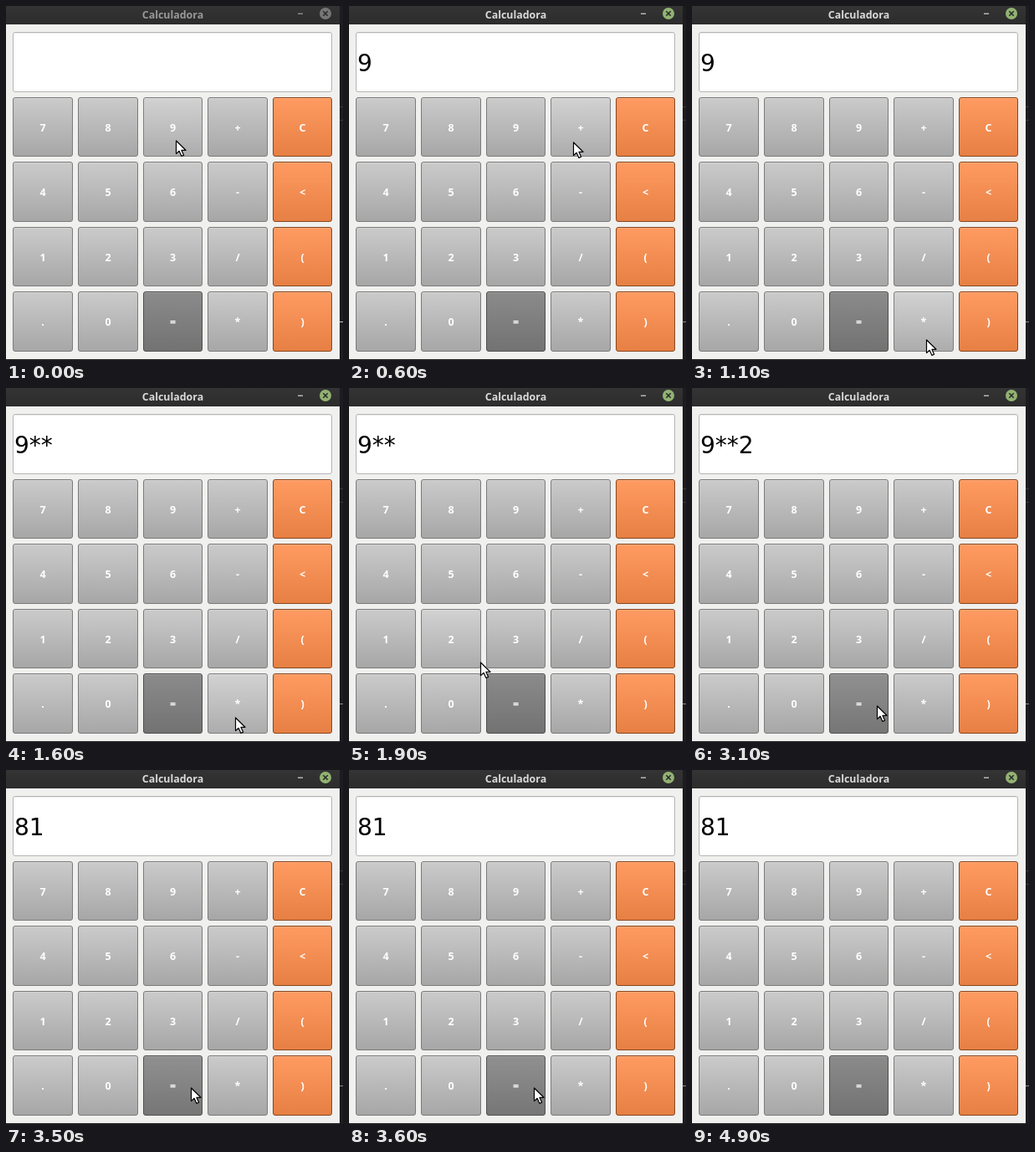
An HTML page with a canvas for the animation above (5600 ms loop, 403 by 423 pixels).

```html
<!DOCTYPE html>
<html lang="es">
<head>
<meta charset="utf-8">
<title>Calculadora</title>
<style>
  html, body { margin: 0; width: 100%; height: 100%; overflow: hidden; background: #1e1c20; }
  canvas { display: block; }
</style>
</head>
<body>
<canvas id="stage" width="403" height="423"></canvas>
<script>
const ctx = document.getElementById('stage').getContext('2d');
const LOOP = 5600, STEP = 100;
const PITCH = 77.6, SIZE = 71.6;
const rows = ['789+C', '456-<', '123/(', '.0=*)'];

const themes = {
  grey:   { top: '#cbcbcb', bottom: '#a6a6a6', edge: '#7b7b7b' },
  dark:   { top: '#8b8b8b', bottom: '#727272', edge: '#4f4f4f' },
  orange: { top: '#ff9b62', bottom: '#e67f43', edge: '#87481f' }
};

const presses = [
  { key: '9', time: 300 }, { key: '*', time: 1300 }, { key: '*', time: 1500 },
  { key: '2', time: 2400 }, { key: '=', time: 3500 }
];

// Each move glides to a point; bow bends its path sideways.
const home = { x: 203, y: 160 };
const moves = [
  { from: 400, to: 600, x: 268, y: 162 },
  { from: 600, to: 1100, x: 280, y: 398, bow: 24 },
  { from: 1500, to: 1600, x: 274, y: 393 },
  { from: 1600, to: 2200, x: 118, y: 305 },
  { from: 2600, to: 2700, x: 224, y: 399 },
  { from: 2900, to: 3100, x: 221, y: 379 },
  { from: 4600, to: 4800, x: 127, y: 95 }
];
const LEAVE = 4900;

const easeOut = p => 1 - (1 - p) ** 2;

function pointerAt(t) {
  let { x, y } = home;
  for (const move of moves) {
    if (t < move.from) break;
    const p = easeOut(Math.min(1, (t - move.from) / (move.to - move.from)));
    x += (move.x - x) * p + (move.bow || 0) * Math.sin(Math.PI * p);
    y += (move.y - y) * p;
  }
  return { x: Math.round(x), y: Math.round(y) };
}

function displayAt(t) {
  const typed = presses.filter(press => press.time <= t).map(press => press.key).join('');
  if (!typed.endsWith('=')) return typed;
  const [base, power] = typed.slice(0, -1).split('**');
  return String(base ** power);
}

function fill(color, x, y, w, h) {
  ctx.fillStyle = color;
  ctx.fillRect(x, y, w, h);
}

function shade(top, bottom, y, h) {
  const paint = ctx.createLinearGradient(0, y, 0, y + h);
  paint.addColorStop(0, top);
  paint.addColorStop(1, bottom);
  return paint;
}

function box(x, y, w, h, paint, edge) {
  ctx.beginPath();
  ctx.roundRect(x + 0.5, y + 0.5, w - 1, h - 1, 2.5);
  ctx.fillStyle = paint;
  ctx.fill();
  ctx.strokeStyle = edge;
  ctx.lineWidth = 1;
  ctx.stroke();
}

function text(str, x, y, font, color, align = 'center') {
  ctx.font = font;
  ctx.fillStyle = color;
  ctx.textAlign = align;
  ctx.fillText(str, x, y);
}

function drawWindow(active) {
  fill('#1e1c20', 0, 0, 403, 423);
  fill('#39373b', 399, 120, 4, 1);
  fill('#39373b', 399, 136, 4, 1);
  fill(active ? '#8b8a8d' : '#c4c4c6', 399, 377, 4, 1);
  fill('#f0f0ef', 0, 22, 399, 400);
  fill(shade('#343434', '#2c2c2c', 0, 22), 0, 0, 399, 22);

  const ink = active ? '#dadada' : '#999999';
  text('Calculadora', 199.5, 15, '600 12.4px "Noto Sans", sans-serif', ink);
  fill(active ? '#b5b5b5' : '#888888', 349, 8.5, 6, 1.5);

  ctx.beginPath();
  ctx.arc(382, 9, 7, 0, Math.PI * 2);
  ctx.fillStyle = active ? '#92b372' : '#777777';
  ctx.fill();
  ctx.beginPath();
  for (const side of [-2.7, 2.7]) {
    ctx.moveTo(382 - side, 6.3);
    ctx.lineTo(382 + side, 11.7);
  }
  ctx.strokeStyle = '#2b2b2b';
  ctx.lineWidth = 1.6;
  ctx.stroke();
}

function drawDisplay(value) {
  box(8, 31, 382, 72, '#ffffff', '#b4b4b4');
  fill('#ebebeb', 10, 32, 378, 1);
  text(value, 10, 78, '28px "DejaVu Sans", sans-serif', '#000000', 'left');
}

function drawButton(label, col, row, pointer) {
  const left = 8.4 + col * PITCH, top = 108.8 + row * (PITCH - 0.2);
  const x = Math.round(left), w = Math.round(left + SIZE) - x;
  const y = Math.round(top), h = Math.round(top + SIZE) - y;
  const theme = themes[col === 4 ? 'orange' : label === '=' ? 'dark' : 'grey'];
  const hover = pointer.x >= x && pointer.x < x + w && pointer.y >= y && pointer.y < y + h;

  ctx.filter = hover ? 'brightness(1.04)' : 'none';
  box(x, y, w, h, shade(theme.top, theme.bottom, y, h), theme.edge);
  ctx.filter = 'none';
  fill('rgba(255,255,255,0.16)', x + 2, y + 1, w - 4, 1);
  text(label, x + w / 2, Math.round(y + h / 2 + 5), 'bold 12.5px "Noto Sans", sans-serif', '#ffffff');
}

function drawPointer({ x, y }) {
  ctx.save();
  ctx.translate(x, y);
  ctx.fillStyle = '#ffffff';
  ctx.strokeStyle = '#000000';
  ctx.lineWidth = 1.2;
  ctx.lineJoin = 'round';
  const arrow = new Path2D('M.5 1V16.6L4.1 13.3L6.9 19.4L9.6 18.2L6.9 12.3H12Z');
  ctx.fill(arrow);
  ctx.stroke(arrow);
  ctx.restore();
}

function render(now) {
  const t = Math.floor(now % LOOP / STEP) * STEP;
  const pointer = pointerAt(t);
  const visible = t < LEAVE;
  drawWindow(t >= presses[0].time);
  drawDisplay(displayAt(t));
  rows.forEach((labels, row) =>
    [...labels].forEach((label, col) => drawButton(label, col, row, pointer)));
  if (visible) drawPointer(pointer);
}

const start = performance.now();
function tick() {
  render(performance.now() - start);
  requestAnimationFrame(tick);
}
tick();
</script>
</body>
</html>
```
